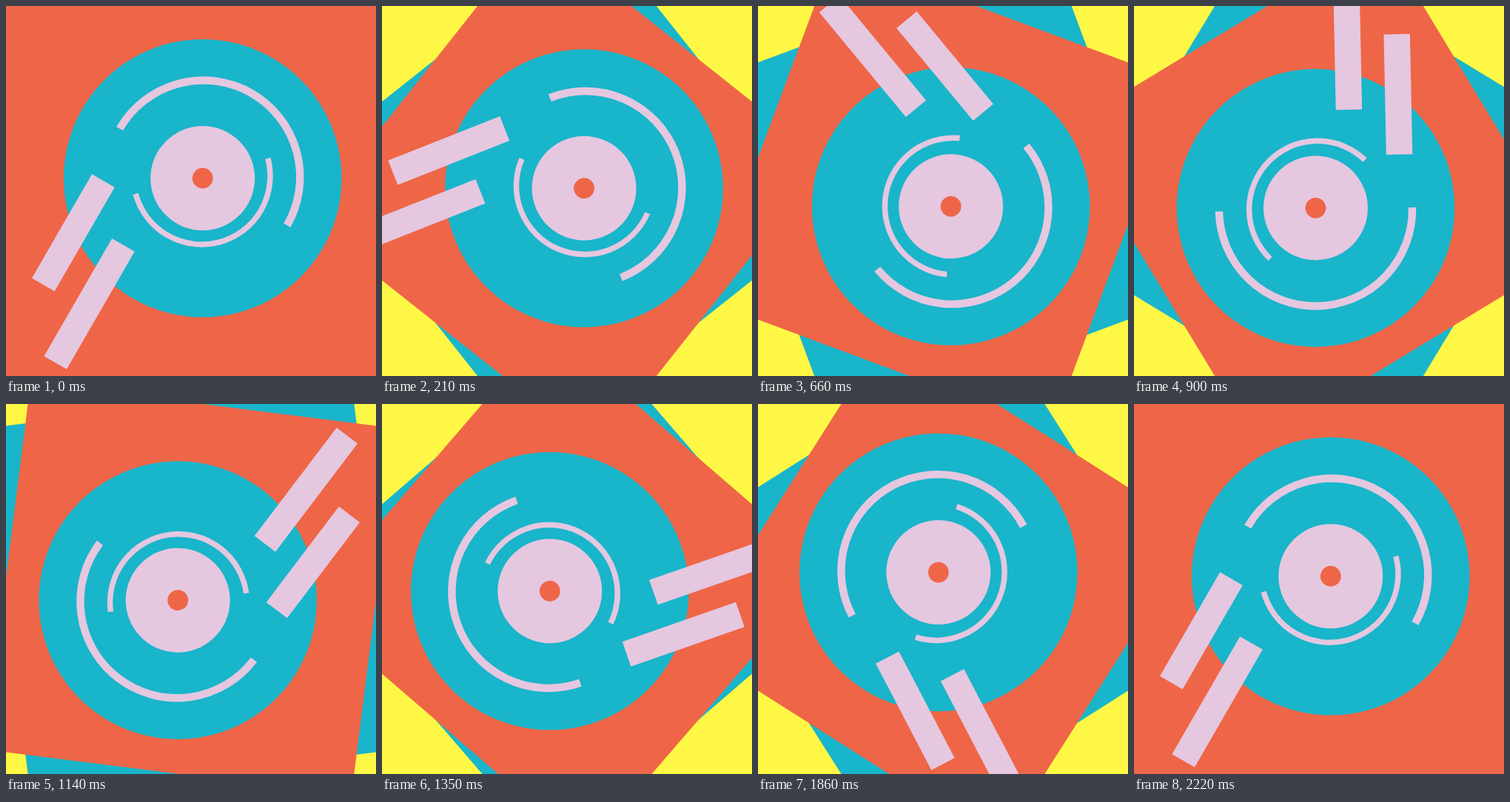
These frames come from a looping animation (500 px wide and 500 px high, 2250 ms). An HTML page:

```html
<!DOCTYPE html>
<html lang="en">
<head>
<meta charset="utf-8">
<title>Spinning record</title>
<style>
  html, body { margin: 0; height: 100%; overflow: hidden; background: #fff746; }
  svg { display: block; width: 100%; height: 100%; }
  .teal { fill: #19b5ca; }
  .orange { fill: #ee6647; }
  .pink { fill: #e5c7e0; }
  .groove { fill: none; stroke: #e5c7e0; }
</style>
</head>
<body>
<svg viewBox="0 0 500 500">
  <rect id="back" class="teal" width="500" height="500"/>
  <g id="deck">
    <rect class="orange" width="500" height="500"/>
    <g transform="translate(265.75 232.75)">
      <circle class="teal" r="187.8"/>
      <circle class="pink" r="70.5"/>
      <circle class="orange" r="13.9"/>
      <path class="groove" stroke-width="10.4" transform="translate(1 -1.7) rotate(30)"
            d="M-130.6 0A130.6 130.6 0 0 1 130.6 0"/>
      <path class="groove" stroke-width="7.5" transform="translate(-1.25 -3) rotate(-15)"
            d="M-92.5 0A92.5 92.5 0 0 0 92.5 0"/>
    </g>
    <rect class="pink" x="-17.7" y="-81.2" width="35.4" height="162.4"
          transform="translate(90.9 306.4) rotate(30)"/>
    <rect class="pink" x="-17.7" y="-91.8" width="35.4" height="183.6"
          transform="translate(112.6 402.5) rotate(30)"/>
  </g>
</svg>
<script>
  const STEP = 30, STEPS = 75;
  const back = document.getElementById('back');
  const deck = document.getElementById('deck');

  const spin = (node, angle) => node.setAttribute('transform', `rotate(${angle} 250 250)`);

  function draw(now) {
    const step = Math.floor((now + 0.5) / STEP) % STEPS;
    // The turn rests upright for the last and first step, then runs evenly.
    const angle = step ? (step + 1) * 360 / STEPS : 0;
    spin(deck, angle);
    spin(back, -angle);
    requestAnimationFrame(draw);
  }
  draw(0);
</script>
</body>
</html>
```
